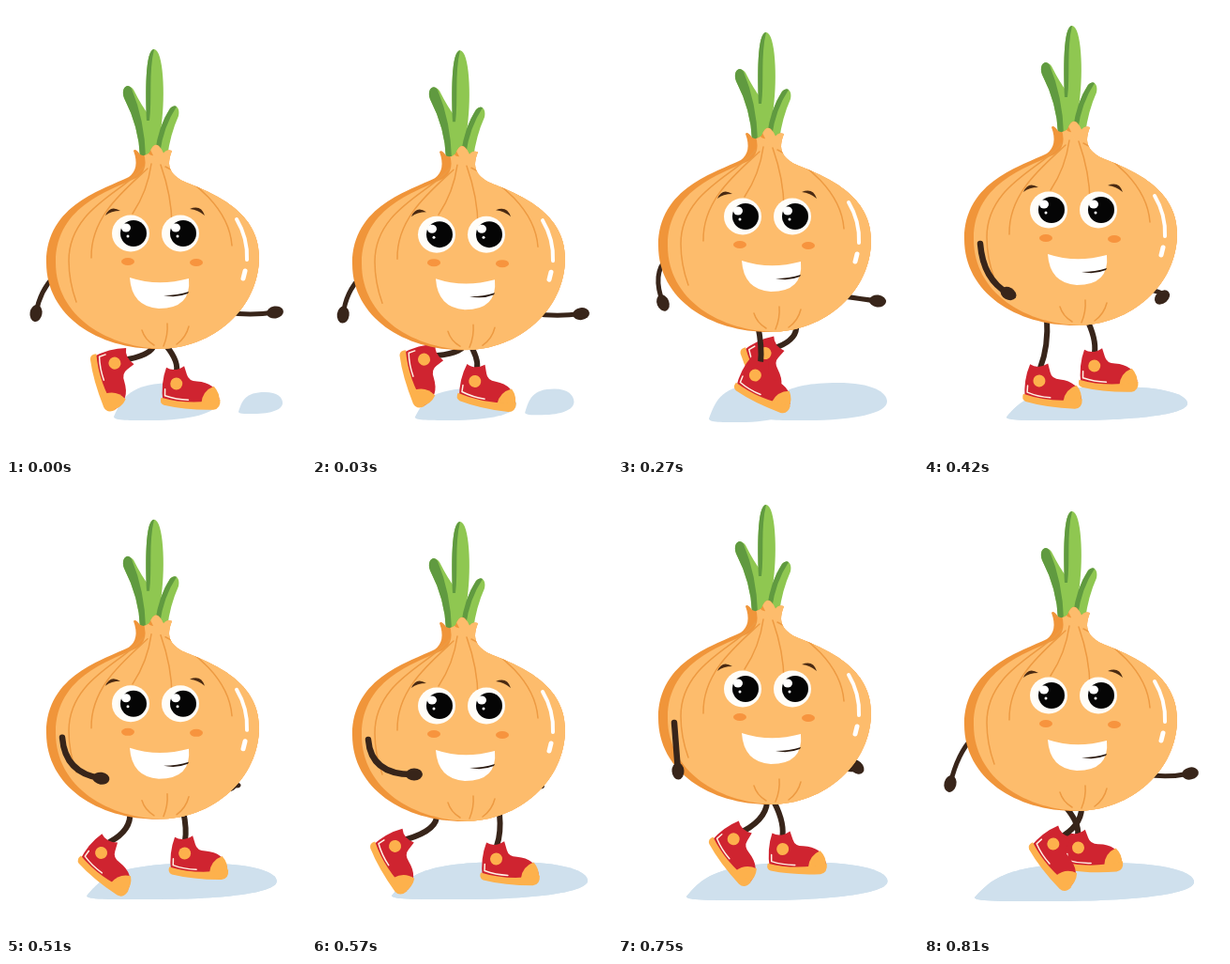
Recreate the animation shown at these times as an HTML page with a canvas. Size 320 px wide and 480 px high, loop 870 ms.

```html
<!DOCTYPE html>
<html lang="en">
<head>
<meta charset="utf-8">
<title>Walking onion</title>
<style>
html, body { margin: 0; width: 100%; height: 100%; overflow: hidden; background: #fff; }
canvas { display: block; width: 320px; height: 480px; }
</style>
</head>
<body>
<canvas id="stage" width="320" height="480"></canvas>
<script>
const ctx = document.getElementById('stage').getContext('2d');
const LOOP = 870;
const LIMB = '#38251a', SKIN = '#fdbc6c', SHADE = '#f0953a', LINE = '#ed9a42';
const RED = '#cf2430', YELLOW = '#fdb14c', LEAF = '#8fc751', LEAF_DARK = '#609a40';

// start time, position in the pose list, extra body drop
const STEPS = [
  [0, 0, 0], [30, .4, 4], [180, 1, 0], [270, 2, 0], [330, 2.5, -2], [420, 3, 0],
  [510, 3.6, 5], [570, 4, 0], [660, 5, 0], [750, 5.5, -7], [810, 6, 0]
];

// body drop, left hand x y, right hand x y, far leg (hip x, ankle x y, angle), near leg
const POSES = [
  [25, 32, 327, 287, 326, 158, 130, 375, 70, 167, 182, 387, 1],
  [18, 35, 321, 287, 320, 168, 139, 365, 70, 168, 167, 381, 20],
  [7, 48, 316, 277, 314, 190, 170, 362, 60, 149, 152, 379, 22],
  [0, 90, 306, 254, 310, 173, 182, 368, 1, 131, 124, 384, 4],
  [18, 109, 308, 225, 318, 200, 197, 383, 2, 133, 101, 376, 56],
  [7, 100, 305, 225, 307, 179, 187, 374, 1, 150, 120, 362, 50],
  [7, 28, 318, 284, 307, 148, 164, 371, -2, 168, 149, 372, 48]
];

// two ground blobs per pose: left, top, right, bottom
const SHADOWS = [
  [115, 401, 226, 441, 248, 411, 295, 434],
  [102, 416, 206, 441, 196, 402, 256, 437],
  [97, 403, 190, 443, 155, 401, 287, 441],
  [88, 405, 281, 441, 88, 405, 281, 441],
  [85, 401, 294, 441, 85, 401, 294, 441],
  [92, 401, 287, 441, 92, 401, 287, 441],
  [54, 402, 288, 443, 54, 402, 288, 443]
];

const BULB = new Path2D(`M136 129Q143 148 131 157C105 170 43 186 43 248C43 305 98 340 162 340
  C222 340 270 296 270 242C270 190 214 172 188 161C172 152 172 142 177 129Q171 127 168 132
  Q160 114 153 131Q148 136 143 133Q138 126 136 129Z`);
const VEINS = `M147 146C128 172 67 190 67 246Q67 268 75 290M151 148C125 172 90 200 91 243
  M155 143Q151 172 135 196M165 144Q177 178 177 209M170 146C200 160 238 190 241 230
  M172 313Q173 325 168 337M145 320Q148 330 158 336M195 316Q192 328 182 335`;

function fill(path, color) {
  ctx.fillStyle = color;
  ctx.fill(path instanceof Path2D ? path : new Path2D(path));
}

function stroke(path, color, width) {
  ctx.strokeStyle = color;
  ctx.lineWidth = width;
  ctx.stroke(new Path2D(path));
}

function oval(x, y, rx, ry, color, angle = 0) {
  ctx.beginPath();
  ctx.ellipse(x, y, rx, ry, angle, 0, 7);
  ctx.fillStyle = color;
  ctx.fill();
}

function at(x, y, angle, draw) {
  ctx.save();
  ctx.translate(x, y);
  ctx.rotate(angle * Math.PI / 180);
  draw();
  ctx.restore();
}

function mix(list, pos) {
  const i = Math.floor(pos), next = list[Math.min(i + 1, list.length - 1)];
  return list[i].map((v, k) => v + (next[k] - v) * (pos - i));
}

function shadow(x1, y1, x2, y2) {
  ctx.save();
  ctx.translate(x1, y1);
  ctx.scale(x2 - x1, y2 - y1);
  fill('M0 .9C.08 .4 .15 0 .6 0C.88 0 1 .25 1 .5C1 .8 .75 1 .35 1C.1 1 0 1 0 .9Z', '#cfe0ed');
  ctx.restore();
}

function shoe() {
  fill('M-11 -2Q-2 3 8 -4L11 5Q13 12 22 12Q42 13 46 30L45 37L-14 35Q-17 15 -11 -2Z', RED);
  fill('M27 35Q28 22 40 17Q47 24 46 34Z', YELLOW);
  fill('M-16 30Q14 38 47 31Q48 41 40 42Q10 43 -13 38Q-18 36 -16 30Z', YELLOW);
  oval(0, 15, 6.5, 6.5, YELLOW);
  stroke('M-12 21L-12 28Q0 32 13 32', '#fff3e6', 1.5);
}

function leg(drop, hip, x, y, angle) {
  const top = 332 + drop;
  stroke(`M${hip} ${top}Q${Math.max(hip, x) + 2} ${(top + 8 + y) / 2} ${x} ${y + 1}`, LIMB, 6);
  at(x, y, angle, shoe);
}

function arm(x0, y0, cx, cy, x, y, width) {
  stroke(`M${x0} ${y0}Q${cx} ${cy} ${x} ${y}`, LIMB, width);
  oval(x, y, 9, 6.5, LIMB, Math.atan2(y - cy, x - cx));
}

function leaves() {
  const middle = 'C149 70 148 21 158 21C168 22 170 70 166 100L162 134L150 134Z';
  fill('M143 136Q142 104 126 73C122 62 130 56 136 64Q145 82 153 92L160 136Z', LEAF);
  fill('M143 136Q142 104 126 73C122 62 130 56 134 63Q148 97 149 136Z', LEAF_DARK);
  fill('M150 97' + middle, LEAF);
  fill('M150 97C149 70 148 21 158 21C152 45 156 75 153 97Z', LEAF_DARK);
  fill('M158 136Q163 102 175 84C181 78 186 84 184 92Q175 112 172 136Z', LEAF);
  fill('M159 130Q163 102 175 84Q179 80 182 82Q168 103 164 132Z', LEAF_DARK);
}

function eye(x) {
  oval(x, 217, 20, 19.5, '#fffdf8');
  oval(x + 3, 217, 14, 14, '#050505');
  oval(x - 5, 211, 5, 4.5, '#fff');
  oval(x - 3, 220, 1.5, 1.5, '#fff');
}

function face() {
  eye(133);
  eye(186);
  fill('M106 198Q111 186 122 193Q112 193 106 198Z', '#4a2a12');
  fill('M196 191Q208 186 212 198Q205 192 196 191Z', '#4a2a12');
  oval(130, 247, 7, 4, '#f7943e');
  oval(203, 248, 7, 4, '#f7943e');
  fill('M132 264Q162 274 195 265Q198 297 163 297Q134 295 132 264Z', '#fff');
  fill('M168 283Q183 283 195 279L194 281Q182 286 168 283Z', '#2b1a10');
}

function body() {
  leaves();
  fill(BULB, SHADE);
  ctx.save();
  ctx.clip(BULB);
  ctx.translate(10, 0);
  fill(BULB, SKIN);
  ctx.translate(-10, 0);
  fill('M150 120H290V345H165V150Z', SKIN);
  stroke(VEINS, LINE, 1.5);
  ctx.restore();
  face();
  stroke('M246 202Q258 222 257 245', '#fff', 4);
  stroke('M255 257L253 265', '#fff', 5);
}

function render(time) {
  const step = STEPS.filter(s => s[0] <= time).pop();
  const [y, lx, ly, rx, ry, ...legs] = mix(POSES, step[1]);
  const ground = mix(SHADOWS, step[1]);
  const drop = y + step[2];
  const front = lx > 58;

  ctx.clearRect(0, 0, 320, 480);
  ctx.lineCap = ctx.lineJoin = 'round';
  shadow(...ground.slice(0, 4));
  shadow(...ground.slice(4));
  arm(235, 301 + drop, 260, 305 + drop, rx, ry + step[2], 5);
  if (!front) arm(52, 262 + drop, 36, 278 + drop, lx, ly + step[2], 5);
  leg(drop, ...legs.slice(0, 4));
  leg(drop, ...legs.slice(4));
  at(0, drop, 0, body);
  if (front) arm(60, 253 + drop, 63, 291 + drop, lx, ly + step[2], 6.5);
}

const start = performance.now();
function tick() {
  render((performance.now() - start) % LOOP);
  requestAnimationFrame(tick);
}
tick();
</script>
</body>
</html>
```
